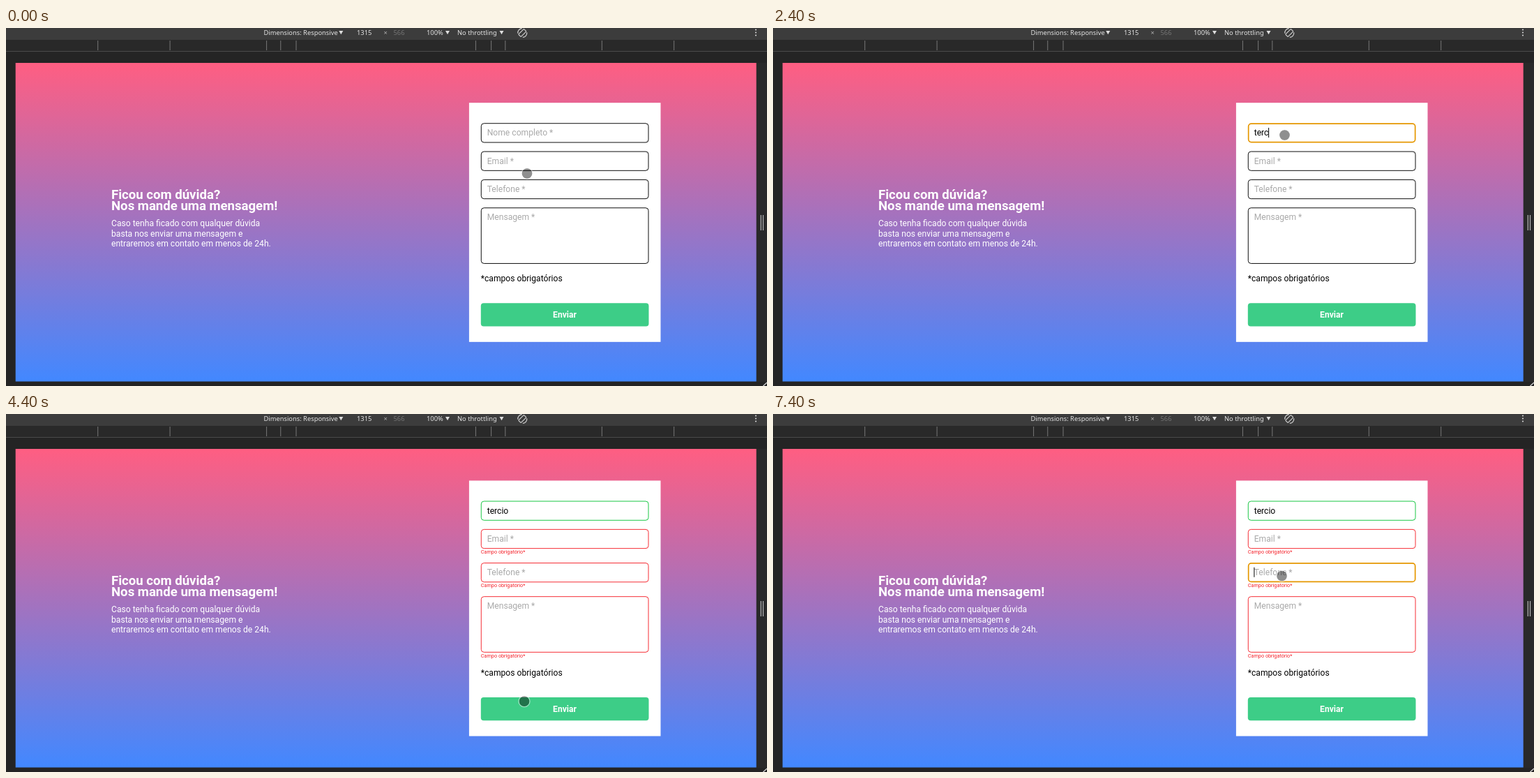
Recreate the animation shown at these times as an HTML page with a canvas. Size 1091x513 px, loop 8000 ms.

```html
<!DOCTYPE html>
<html lang="pt-BR">
<head>
<meta charset="utf-8">
<title>Formulário de contato</title>
<style>
  html, body { margin: 0; width: 100%; height: 100%; overflow: hidden; background: #242424; }
  canvas { display: block; }
</style>
</head>
<body>
<canvas id="stage" width="1091" height="513"></canvas>
<script>
const LOOP = 8000, STEP = 100;
const ZOOM = 1062 / 1315;   // stage pixels per page pixel
const ctx = document.getElementById('stage').getContext('2d');

const BODY = '15px Roboto, sans-serif';
const BOLD = 'bold 15px Roboto, sans-serif';
const TITLE = 'bold 23px Roboto, sans-serif';
const SMALL = '9px Roboto, sans-serif';
const BAR = '11.55px "Noto Sans", "Open Sans", sans-serif';
const RED = '#f5222b', GREEN = '#0fc43c', ORANGE = '#e59700', HINT = '#a9a9a9';

const HERO = { x: 13.7, y: 50, w: 1062, h: 456.5 };
const FIELD = { x: 680.8, w: 240.7, h: 28.2, gap: 12.15, radius: 4 };
const ERROR_H = 7.8;

const NAME = 'tercio';
const KEY_TIMES = [1700, 1900, 2200, 2400, 3200, 3200];
const FOCUS_NAME = 1300, SPELLCHECK = 3700, SUBMIT = 4400, FOCUS_PHONE = 7400;

// pointer moves: start time, end time, destination
const HOME = [747, 208.5];
const MOVES = [
  [0, 500, 731, 156.5], [500, 800, 731, 153.5], [1200, 1400, 733.5, 153.5],
  [3600, 4000, 760, 432], [4000, 4200, 743, 411.7], [5200, 5600, 677.5, 212.5],
  [5600, 6000, 715.8, 185.2], [6000, 6300, 736, 184], [6400, 6800, 729.5, 235],
  [6800, 7000, 729.5, 232]
];

const easeOut = p => 1 - (1 - p) ** 2;

function rect(x, y, w, h, color) {
  ctx.fillStyle = color;
  ctx.fillRect(x, y, w, h);
}

function text(str, x, y, font, color, align = 'left') {
  ctx.save();
  ctx.translate(x, y);
  ctx.scale(ZOOM, ZOOM);
  ctx.font = font;
  ctx.fillStyle = color;
  ctx.textAlign = align;
  ctx.fillText(str, 0, 0);
  ctx.restore();
}

function textWidth(str, font) {
  ctx.font = font;
  return ctx.measureText(str).width * ZOOM;
}

function stroke(color, width) {
  ctx.strokeStyle = color;
  ctx.lineWidth = width;
  ctx.stroke();
}

function disc(x, y, r, color) {
  ctx.beginPath();
  ctx.arc(x, y, r, 0, Math.PI * 2);
  ctx.fillStyle = color;
  ctx.fill();
}

function arrow(x) {
  ctx.beginPath();
  ctx.moveTo(x, 4);
  ctx.lineTo(x + 6, 4);
  ctx.lineTo(x + 3, 9.3);
  ctx.fillStyle = '#dedede';
  ctx.fill();
}

function rotateIcon() {
  ctx.save();
  ctx.translate(740.3, 7);
  ctx.rotate(Math.PI / 4);
  ctx.beginPath();
  ctx.roundRect(-2.5, -5.5, 5, 11, 1);
  stroke('#cfcfcf', 1.2);
  for (const mid of [0, Math.PI]) {
    ctx.beginPath();
    ctx.arc(0, 0, 6.5, mid - 0.9, mid + 0.7);
    stroke('#cfcfcf', 1.2);
  }
  ctx.restore();
}

// one pair of marks per common screen width
function ruler() {
  const mid = HERO.x + HERO.w / 2;
  for (const size of [320, 375, 425, 768, 1024]) {
    const half = size / 2 * ZOOM;
    rect(mid - half, 18, 1, 14, '#777');
    rect(mid + half - 1, 18, 1, 14, '#777');
  }
}

function toolbar() {
  rect(0, 0, 1091, 513, '#242424');
  rect(0, 0, 1091, 17, '#3c3c3c');
  rect(0, 17, 1091, 16, '#292929');
  rect(0, 33, 1091, 1, '#4a4a4a');
  ruler();

  const ink = '#e4e4e4';
  text('Dimensions: Responsive', 369.5, 10.3, BAR, ink);
  text('1315', 503, 10.3, BAR, ink);
  text('×', 541.5, 10.3, BAR, '#b5b5b5');
  text('566', 555.5, 10.3, BAR, '#757575');
  text('100%', 603, 10.3, BAR, ink);
  text('No throttling', 647, 10.3, BAR, ink);
  [477.3, 630, 707.5].forEach(arrow);
  rotateIcon();
  for (let i = 0; i < 3; i++) disc(1075, 2.5 + i * 4, 1.1, '#d0d0d0');

  rect(1076, 50, 15, 457, '#292929');
  for (const x of [1081.7, 1084.9]) rect(x, 268, 1.2, 22, '#b8b8b8');
  ctx.beginPath();
  ctx.moveTo(1085.5, 513);
  ctx.lineTo(1091, 508);
  stroke('#d0d0d0', 1.4);
}

function hero() {
  const { x, y, w, h } = HERO;
  const sky = ctx.createLinearGradient(0, y, 0, y + h);
  sky.addColorStop(0, '#ff5e82');
  sky.addColorStop(1, '#4288ff');
  rect(x, y, w, h, sky);

  text('Ficou com dúvida?', 151, 245.3, TITLE, '#fff');
  text('Nos mande uma mensagem!', 151, 261.4, TITLE, '#fff');
  ['Caso tenha ficado com qualquer dúvida',
   'basta nos enviar uma mensagem e',
   'entraremos em contato em menos de 24h.'
  ].forEach((line, i) => text(line, 151, 284.3 + i * 14.5, BODY, '#fff'));
}

function caret(x, y) {
  rect(x, y + 6.7, 1, 14, '#000');
}

function squiggle(x, y, width) {
  ctx.beginPath();
  for (let i = 0; i * 2 <= width; i++)
    ctx.lineTo(x + i * 2, y + (i % 2 ? -0.8 : 0.8));
  stroke('#f04a4a', 0.9);
}

function field(y, h, value, color, border, focus) {
  const w = focus ? 1.7 : 0.95;
  ctx.beginPath();
  ctx.roundRect(FIELD.x + w / 2, y + w / 2, FIELD.w - w, h - w, FIELD.radius);
  stroke(focus ? ORANGE : border, w);
  text(value, 689.7, y + 18, BODY, color);
}

function form(t) {
  const sent = t >= SUBMIT;
  const typed = NAME.slice(0, KEY_TIMES.filter(k => k <= t).length);
  const typedW = textWidth(typed, BODY);
  const height = 342.7 + (sent ? 3 * ERROR_H : 0);
  const top = 278.5 - height / 2;
  rect(663.9, top, 274.6, height, '#fff');

  const inputs = [
    { hint: 'Nome completo *', value: typed, focus: t >= FOCUS_NAME && !sent },
    { hint: 'Email *' },
    { hint: 'Telefone *', focus: t >= FOCUS_PHONE },
    { hint: 'Mensagem *', h: 80.6 }
  ];
  let y = top + 29.1;
  for (const { hint, value, focus, h = FIELD.h } of inputs) {
    const invalid = sent && !value;
    const border = invalid ? RED : sent ? GREEN : '#000';
    field(y, h, value || hint, value ? '#000' : HINT, border, focus);
    if (focus) caret(689.4 + (value ? typedW : 0), y);
    if (value && focus && t >= SPELLCHECK) squiggle(690, y + 19.6, typedW);
    y += h;
    if (invalid) {
      text('Campo obrigatório*', FIELD.x, y + 6.7, SMALL, RED);
      y += ERROR_H;
    }
    y += FIELD.gap;
  }

  text('*campos obrigatórios', FIELD.x, y + 13, BODY, '#000');
  ctx.beginPath();
  ctx.roundRect(FIELD.x, y + 44.2, FIELD.w, 33.2, FIELD.radius);
  ctx.fillStyle = '#3dcd87';
  ctx.fill();
  text('Enviar', 801, y + 65, BOLD, '#fff', 'center');
}

function pointer(t) {
  const now = Math.floor(t / STEP) * STEP;
  let [x, y] = HOME;
  for (const [from, to, toX, toY] of MOVES) {
    if (now < from) break;
    const p = easeOut(Math.min(1, (now - from) / (to - from)));
    x += (toX - x) * p;
    y += (toY - y) * p;
  }
  disc(x, y, 7.5, 'rgba(0,0,0,.44)');
  ctx.beginPath();
  ctx.arc(x, y, 8, 0, Math.PI * 2);
  stroke('rgba(255,255,255,.5)', 1.3);
}

const start = performance.now();
function draw() {
  const t = (performance.now() - start) % LOOP;
  toolbar();
  hero();
  form(t);
  pointer(t);
  requestAnimationFrame(draw);
}
draw();
</script>
</body>
</html>
```
